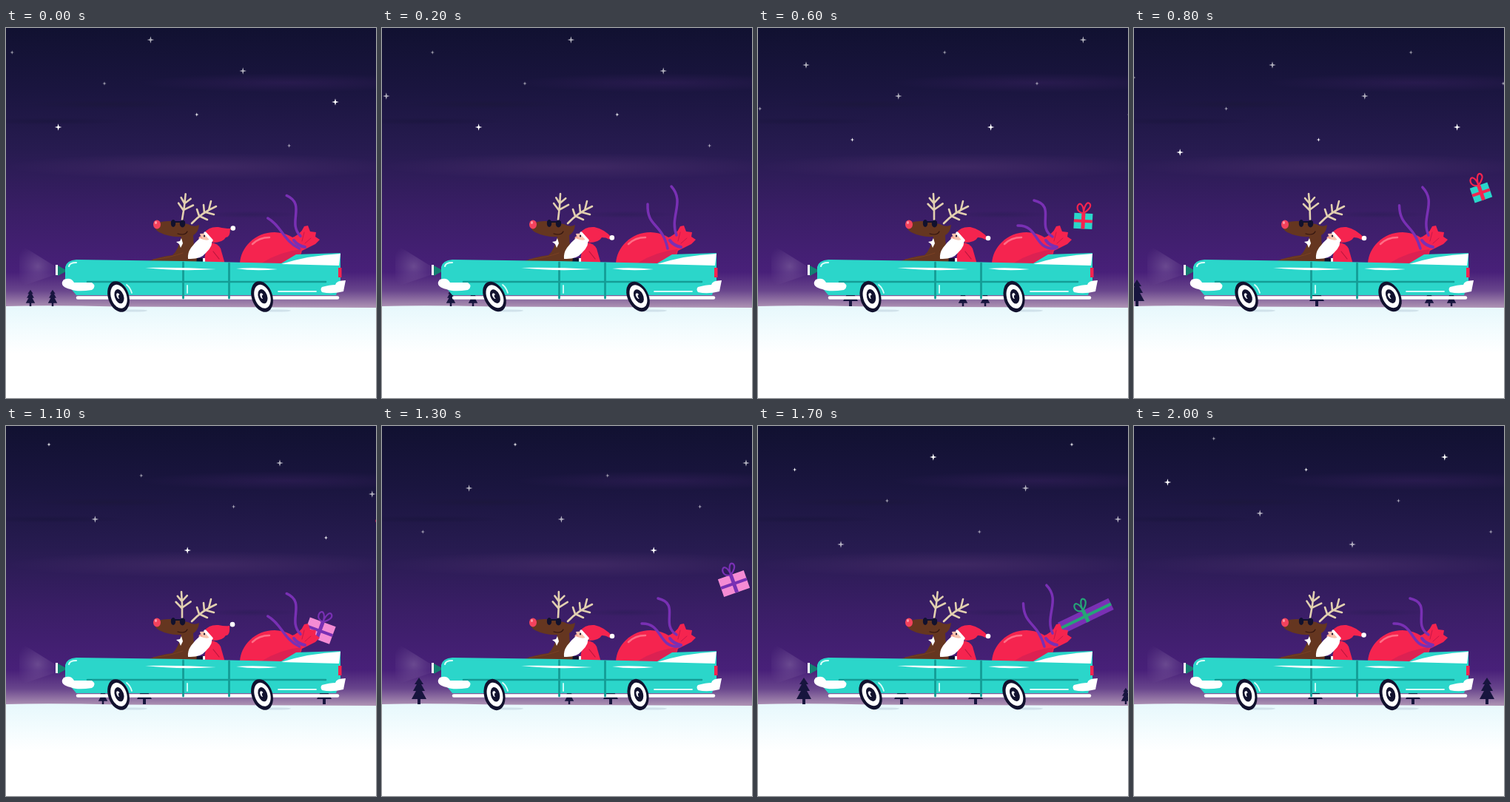
An HTML page with a canvas that plays this animation: 500x500 px, repeating every 2.1 s.

```html
<!DOCTYPE html>
<html lang="en">
<head>
<meta charset="utf-8">
<title>Night drive</title>
<style>
html, body { margin: 0; width: 100%; height: 100%; overflow: hidden; background: #15133a; }
canvas { display: block; }
</style>
</head>
<body>
<canvas id="stage" width="500" height="500"></canvas>
<script>
const g = document.getElementById('stage').getContext('2d');
const STEP = 100, STEPS = 21;
const TEAL = '#2bd6ca', DARK_TEAL = '#149d96', RED = '#f5244f', BROWN = '#653620',
      INK = '#11112e', BONE = '#e2d0b0', PURPLE = '#7930b4', WHITE = '#fff';

const wave = (s, period, peak) => Math.cos(2 * Math.PI * (s - peak) / period);
const clamp = v => Math.min(1, Math.max(0, v));

// The road starts slowly, then runs at full speed.
const travel = s => Math.max(30 * s, 61 * (s - 2));
// Wind gusts lift the ribbons and lean the wheels three times per loop.
const gust = s => clamp(.5 + .7 * wave(s, 7, 2));

function fill(d, color) { g.fillStyle = color; g.fill(new Path2D(d)); }

function line(d, color, width) {
  g.strokeStyle = color;
  g.lineWidth = width;
  g.lineCap = g.lineJoin = 'round';
  g.stroke(new Path2D(d));
}

function oval(x, y, rx, ry, color) {
  g.fillStyle = color;
  g.beginPath();
  g.ellipse(x, y, rx, ry, 0, 0, 7);
  g.fill();
}

function placed(x, y, degrees, draw) {
  g.save();
  g.translate(x, y);
  g.rotate(degrees * Math.PI / 180);
  draw();
  g.restore();
}

// Sky and snow
function gradient(y0, y1, ...colors) {
  const p = g.createLinearGradient(0, y0, 0, y1);
  colors.forEach((c, i) => p.addColorStop(i / (colors.length - 1), c));
  return p;
}

const sky = gradient(0, 330, '#111131', '#1a153f', '#271b50', '#3a1e66', '#482079');
const dusk = gradient(330, 380, 'rgba(181,155,184,0)', 'rgba(181,155,184,.3)', '#b59bb8');
const snow = gradient(376, 440, '#e7f8fc', '#f3fcfe', WHITE);

function haze(x, y, rx, ry, rgb, alpha) {
  g.save();
  g.translate(x, y);
  g.scale(rx, ry);
  const p = g.createRadialGradient(0, 0, 0, 0, 0, 1);
  p.addColorStop(0, `rgba(${rgb},${alpha})`);
  p.addColorStop(1, `rgba(${rgb},0)`);
  oval(0, 0, 1, 1, p);
  g.restore();
}

function drawSky() {
  g.fillStyle = sky;
  g.fillRect(0, 0, 500, 500);
  g.fillStyle = dusk;
  g.fillRect(0, 330, 500, 60);
  haze(380, 74, 200, 13, '75,40,115', .3);
  haze(270, 187, 270, 18, '100,65,125', .32);
  haze(140, 103, 110, 6, '25,22,50', .35);
  haze(60, 126, 110, 5, '18,17,50', .35);
  haze(330, 252, 65, 5, '40,28,82', .5);
}

// Evenly spaced stars; their heights step through the sky and wrap around.
function drawStars(s) {
  for (let n = 0; n < 25; n++) {
    const r = n % 2 ? 2.8 : 4.8, k = r * .22;
    g.globalAlpha = n % 3 ? .65 : 1;
    placed(445 - 62.4 * n + travel(s), 10 + (90 + 59 * n) % 160, 0, () =>
      fill(`M0-${r}L${k}-${k}L${r} 0L${k} ${k}L0 ${r}L-${k} ${k}L-${r} 0L-${k}-${k}Z`, WHITE));
  }
  g.globalAlpha = 1;
}

const smallTrees = [33, 63, -418], tallTrees = [-119, -362, -621, -721, -853];

function drawTrees(s) {
  const plant = size => x => placed(x + travel(s), 376, 0, () => {
    g.scale(size, size);
    fill('M0-36L6-27H3L8-18H4L10-7H2V0H-2V-7H-10L-4-18H-8L-3-27H-6Z', '#17153e');
  });
  smallTrees.forEach(plant(.62));
  tallTrees.forEach(plant(1));
}

// Presents leave the sack one after the other and tumble up and away.
const presents = [
  { start: 3, rate: 1, angle: 36, w: 25, h: 21, box: TEAL, band: RED },
  { start: 10, rate: 1.8, angle: 40, w: 37, h: 25, box: '#f58bd4', band: PURPLE },
  { start: 15.7, rate: 2.5, angle: 10, w: 76, h: 17, box: PURPLE, band: '#25a577' }
];

function drawPresents(s) {
  for (const { start, rate, angle, w, h, box, band } of presents) {
    const k = (s - start) * rate;
    if (k < 0) continue;
    placed(404 + 10 * k + .6 * k * k, 290 - 4 * k - 1.9 * k * k, angle - 11 * k, () => {
      g.fillStyle = box;
      g.fillRect(-w / 2, -h / 2, w, h);
      g.fillStyle = band;
      g.fillRect(-w / 2, -2, w, 4);
      g.fillRect(-2.5, -h / 2, 5, h);
      g.translate(0, -h / 2);
      line('M0 0C-13-1-9-15-4-12Q0-9 0 0C0-9 4-18 8-13Q11-8 0 0', band, 2.2);
    });
  }
}

// Each ribbon is a cubic curve that sways between a low and a lifted shape.
const ribbons = [
  { low: [373, 233, 404, 240, 375, 268, 398, 282], lifted: [391, 214, 410, 235, 388, 255, 398, 280] },
  { low: [351, 267, 380, 266, 372, 300, 402, 298], lifted: [359, 238, 358, 270, 378, 262, 386, 298] }
];

function drawSack(s) {
  fill('M384 284Q398 280 403 268L408 267L411 275L419 276L418 282L424 286L418 292Q408 297 398 302Z', RED);
  fill('M316 318C317 297 336 276 363 276Q384 277 397 291Q406 303 388 318Z', RED);
  fill('M345 318Q370 302 399 299Q398 310 388 318Z', '#dc2152');
  line('M333 292Q342 283 356 283', '#ff6d85', 2.5);
  line('M403 276L400 288M412 284L404 291', '#c8174a', 1);
  line('M389 287Q394 294 404 296', PURPLE, 4);
  for (const { low, lifted } of ribbons) {
    const [x, y, ...curve] = low.map((v, i) => v + (lifted[i] - v) * gust(s));
    line(`M${x} ${y}C${curve.join(' ')}`, PURPLE, 3.5);
  }
}

// Passengers
function drawDeer(s) {
  placed(238, 259, 6 + 6 * wave(s, STEPS, 19), () =>
    line('M0 0Q0-18-2-35M-1-13L-9-21M-1-13L11-22M-1-22L-7-29M-1-22L6-30', BONE, 2.6));
  line('M251 264Q264 250 284 241M261 254L258 245M268 250L267 239M274 246L277 234M261 254L272 259M270 249L281 252',
    BONE, 2.6);
  fill('M201 267Q207 260 222 261L246 265Q254 270 261 266Q260 276 253 280Q253 298 260 316H190Q207 309 225 307Q233 300 237 282Q221 283 207 276Q201 273 201 267Z', BROWN);
  line('M232 278Q242 281 245 275', '#321510', 1.2);
  line('M199 313Q223 310 239 304', '#7a4024', 1);
  oval(204, 265.5, 5, 6, '#f3425d');
  oval(202.5, 263, 1.5, 2, '#ff9cab');
  line('M224 262H241', INK, 2);
  oval(226, 264, 3.2, 5, INK);
  oval(238.5, 264.5, 3.7, 5, INK);
  fill('M230 289L235 288L237 284L239 291L236 297L234 292Z', WHITE);
}

function drawSanta(s) {
  const hop = Math.max(0, wave(s, STEPS / 2, .4)) ** 6;
  const x = 311 - 5 * hop, y = 284 - 16 * hop;
  fill('M267 318L272 291Q284 288 290 298L296 319Z', RED);
  line('M280 302L288 312', '#b9173f', 1.2);
  fill('M262 278L276 277L279 289L266 291Z', '#f8c3ae');
  oval(263, 284, 2.5, 2.5, '#f7a795');
  oval(268, 281, 1, 1.5, INK);
  fill('M262 284Q273 290 278 283Q281 294 270 304Q263 313 246 312Q245 304 250 297Q256 289 262 284Z', WHITE);
  fill(`M268 277Q274 268 287 269Q301 272 ${x} ${y}L${x - 4} ${y + 2}Q303 283 297 283Q293 290 280 290Z`, RED);
  line('M269 277L278 287', WHITE, 3.5);
  oval(x, y, 3.3, 3.3, WHITE);
  fill('M258 311H267V318H257Z', INK);
  fill('M266 311L269 311V319H266Z', WHITE);
}

// Car
function drawBeam() {
  const p = g.createRadialGradient(43, 322, 0, 43, 322, 31);
  p.addColorStop(0, 'rgba(180,160,195,.32)');
  p.addColorStop(1, 'rgba(150,120,180,0)');
  fill('M18 292L68 323V333L18 350Z', p);
}

function drawCar() {
  fill('M70 321L83 328L70 335Z', '#147f72');
  fill('M67 320H70V334H67Z', WHITE);
  line('M97 364.5H448', WHITE, 4.5);
  fill('M80 323Q82 314 95 313L239 315L372 318L392 306L452 304V342L446 361H95L80 343Z', TEAL);
  fill('M449 324H453.5V337H449Z', RED);
  fill('M372 319Q410 307 452 305L450 321Z', WHITE);
  line('M110 343H432', DARK_TEAL, 2.6);
  line('M239.5 317V365M301.5 318V365', DARK_TEAL, 2.8);
  line('M85 322Q86 317 95 317', '#d8fffa', 2.2);
  fill('M188 324Q235 323 284 326Q232 329 188 324ZM311 325Q338 323 367 326Q336 329 311 325Z', WHITE);
  line('M163 347Q168 351 170 358M245 348V358M368 356H419', '#d8fffa', 1.8);
  fill('M78 340Q88 336 92 344H116Q123 349 116 354Q96 357 87 353Q74 350 76 343Z', WHITE);
  fill('M427 350Q438 347 445 347Q446 341 459 341L456 356Q440 360 427 357Q424 353 427 350Z', WHITE);
}

function drawWheels(s) {
  for (const x of [152, 346]) {
    oval(x + 20, 382, 19, 1.6, 'rgba(170,190,205,.4)');
    placed(x, 363, -14 - 13 * gust(s), () => {
      oval(0, 0, 14, 21.5, INK);
      oval(.5, 0, 10.5, 16.5, WHITE);
      oval(1, 0, 6, 10, INK);
      oval(0, -1, 2.2, 4, '#f4f4fa');
      oval(1.5, 1, 1.7, 3, INK);
    });
  }
}

function draw() {
  const s = Math.floor(performance.now() / STEP) % STEPS;
  drawSky();
  drawStars(s);
  fill('M0 376Q60 374.5 150 376.5L500 378V500H0Z', snow);
  drawTrees(s);
  drawBeam();
  drawPresents(s);
  drawSack(s);
  drawDeer(s);
  drawSanta(s);
  drawCar();
  drawWheels(s);
  requestAnimationFrame(draw);
}
draw();
</script>
</body>
</html>
```
